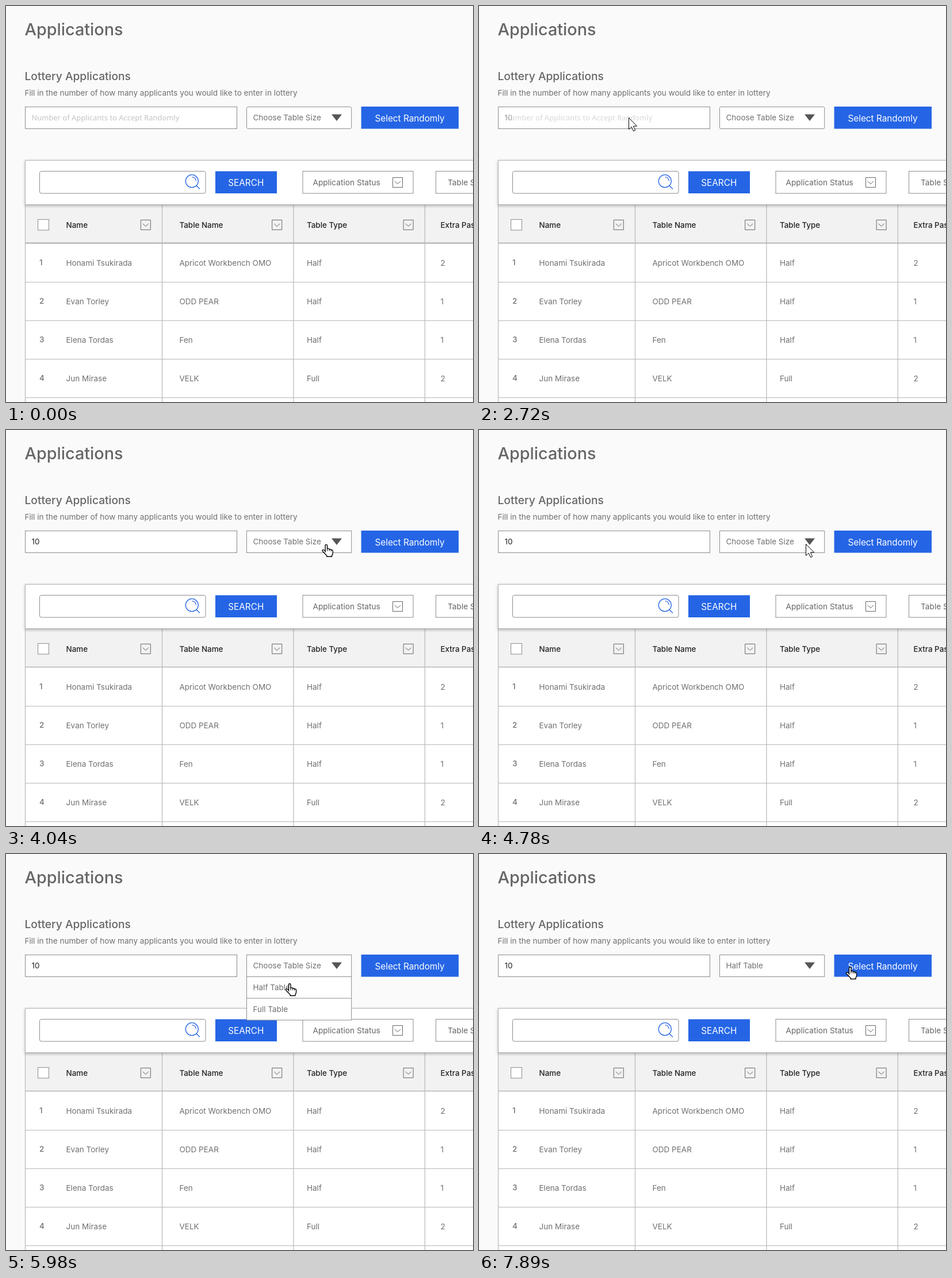
An HTML page that plays this animation: 812 by 689 pixels, repeating every 7.99 s.

```html
<!DOCTYPE html>
<html lang="en">
<head>
<meta charset="utf-8">
<title>Applications</title>
<style>
html, body { margin: 0; width: 100%; height: 100%; overflow: hidden; background: #fafafa; }
svg { display: block; width: 812px; height: 689px; font: 13.5px Inter, sans-serif; font-optical-sizing: none; }
text { fill: #707070; }
.title { font-size: 28.8px; font-weight: 500; fill: #666; }
.sub { font-size: 19.2px; font-weight: 500; fill: #666; }
.head { font-size: 13.4px; font-weight: 500; fill: #222; }
.num { font-weight: 500; }
.filter { font-size: 13.7px; fill: #666; }
.btn { font-size: 15.3px; fill: #fff; }
.hint { font: 12.93px "Noto Sans", sans-serif; fill: #c4c4c4; }
.value { fill: #222; }
.box { fill: #fff; stroke: #8c8c8c; }
.line { fill: none; stroke: #b8b8b8; stroke-width: 1.2; }
.blue { fill: #2565e5; }
.icon { fill: none; stroke: #2565e5; stroke-width: 1.3; stroke-linecap: round; }
.chev { fill: none; stroke: #666; }
.panel { fill: #fff; stroke: #b4b4b4; filter: drop-shadow(0 2px 2.5px #0004); }
.cursor { fill: #fff; stroke: #000; stroke-linejoin: round; }
</style>
</head>
<body>
<svg viewBox="0 0 812 689">
  <text class="title" x="32.5" y="50.5">Applications</text>
  <text class="sub" id="sub" x="32.5">Lottery Applications</text>
  <text x="32.5" y="155.6" font-size="13.55">Fill in the number of how many applicants you would like to enter in lottery</text>

  <rect class="box" x="33.5" y="175.5" width="368" height="38"/>
  <text class="hint" id="hint" x="44.5" y="199">Number of Applicants to Accept Randomly</text>
  <text class="value" id="value" x="44.5" y="199.3">10</text>

  <rect class="blue" x="617.6" y="175" width="169.4" height="38.6"/>
  <text class="btn" x="641.5" y="200.5">Select Randomly</text>

  <g id="table"></g>
  <path class="line" id="rule" d="M33 412.5H812"/>

  <rect class="panel" x="33.5" y="268.5" width="800" height="77"/>
  <rect class="box" x="58.5" y="287.5" width="288.5" height="38.5" rx="3"/>
  <g class="icon">
    <circle cx="323.3" cy="304.7" r="11"/>
    <path d="M331.5 313L336.5 318M324 297.7A7 7 0 0 1 330.3 304"/>
  </g>
  <rect class="blue" x="364" y="287.5" width="107" height="38.5"/>
  <text class="btn" x="386.3" y="313">SEARCH</text>
  <rect class="box" x="516" y="287.5" width="192" height="38.5"/>
  <text class="filter" x="533.5" y="312">Application Status</text>
  <rect class="box" x="747.5" y="287.5" width="192" height="38.5"/>
  <text class="filter" x="768" y="312">Table Size</text>
  <g id="chevrons"></g>

  <rect class="box" id="select" x="418.5" y="175.5" width="182.2" height="38"/>
  <g id="menu">
    <path class="box" d="M418.5 213.5H600.7V289H418.5ZM418.5 251H600.7"/>
    <text x="429.5" y="237">Half Table</text>
    <text x="429.5" y="275">Full Table</text>
  </g>
  <text id="choose" x="429.5" y="199.3">Choose Table Size</text>
  <text id="chosen" x="429.5" y="199.3">Half Table</text>
  <path d="M566 188.5H584L575 200Z" fill="#555"/>

  <g class="cursor" id="cursor">
    <path id="arrow" d="M.5 .5V20.5L5.2 16.2L8.6 23.6L11.6 22.3L8.4 15H14.6Z"/>
    <g id="hand" stroke-width="1.4">
      <path d="M.5 13.5V2.3Q.5 .7 2.2 .7T4 2.3V8Q7.2 7 7.5 9Q10.2 8 10.7 10Q13.6 9.4 13.6 12V15Q13.6 18 12 19.5V21.5H3.2V20Q1 17.5 -4 12.2Q-5.3 10.6 -3.8 9.8Q-2 9.2 .5 12Z"/>
      <path d="M4 8V12M7.5 9V12M10.7 10V12.5" stroke-width="1"/>
    </g>
    <circle id="click" r="15" fill="#efef00" fill-opacity=".47" stroke="none"/>
  </g>
</svg>
<script>
const LOOP = 7990;
const $ = id => document.getElementById(id);
const text = (x, y, s, cls = '') => `<text class="${cls}" x="${x}" y="${y}">${s}</text>`;
const chevron = (x, y) =>
  `<path class="chev" d="M${x - 8.5} ${y - 8.5}h17v17h-17ZM${x - 5} ${y - 2}l5 4.5l5 -4.5"/>`;

// Table
const COL = 228.4, ROW = 67;
const cols = [104.5, 301.5, 523, 755.5];
const heads = ['Name', 'Table Name', 'Table Type', 'Extra Passes'];
const rows = [
  ['Honami Tsukirada', 'Apricot Workbench OMO', 'Half', 2],
  ['Evan Torley', 'ODD PEAR', 'Half', 1],
  ['Elena Tordas', 'Fen', 'Half', 1],
  ['Jun Mirase', 'VELK', 'Full', 2]
];
let table = `<rect class="line" x="33.5" y="345" width="800" height="360" style="fill:#fff"/>
  <rect x="34" y="345" width="800" height="67.5" fill="#f2f2f2"/>
  <rect class="box" x="55.5" y="371.5" width="19" height="18.5"/>`;
let chevrons = chevron(681, 307);
heads.forEach((h, i) => {
  table += text(cols[i], 385.8, h, 'head') + `<path class="line" d="M${271.5 + COL * i} 345V689"/>`;
  chevrons += chevron(242.8 + COL * i, 380.8);
});
rows.forEach((row, r) => {
  const y = 451.8 + ROW * r;
  table += `<path class="line" d="M33 ${480.5 + ROW * r}H812"/>` + text(58, y - .5, r + 1, 'num');
  row.forEach((s, i) => table += text(cols[i], y, s));
});
$('table').innerHTML = table;
$('chevrons').innerHTML = chevrons;

// Pointer: each move eases out from the last stop to the next, some with a slight sway
const home = { x: 379, y: 497 };
const moves = [
  { from: 620, to: 1050, x: 309, y: 167, ease: 2 },
  { from: 1240, to: 1610, x: 260, y: 194, ease: 3.5 },
  { from: 3150, to: 3940, x: 549, y: 199, ease: 2.3, sway: 5 },
  { from: 3960, to: 4350, x: 568, y: 198, ease: 1.5 },
  { from: 5250, to: 5980, x: 491, y: 225, ease: 1.7 },
  { from: 7140, to: 7530, x: 643, y: 196, ease: 2 }
];
const clicks = [[1750, 1850], [4500, 4600], [6910, 6960], [7810, 7890]];
const hands = [[1290, 2390], [3360, 4780], [5480, 7010], [7810, LOOP]];

const within = (t, spans) => spans.some(([a, b]) => t >= a && t < b);
const ramp = (t, a, b) => Math.min(1, Math.max(0, (t - a) / (b - a)));

function pointer(t) {
  let { x, y } = home;
  for (const m of moves) {
    const k = 1 - (1 - ramp(t, m.from, m.to)) ** m.ease;
    x += (m.x - x) * k;
    y += (m.y - y) * k - (m.sway || 0) * Math.sin(2 * Math.PI * k);
  }
  return [x, y];
}

const fade = (id, v) => $(id).setAttribute('opacity', Number(v));

function draw(t) {
  const filled = ramp(t, 2670, 2820);
  const picked = ramp(t, 7050, 7185);
  fade('hint', 1 - filled);
  fade('value', filled);
  $('sub').setAttribute('y', 128.5 + filled / 2);
  $('select').setAttribute('rx', 3 * (1 - filled));
  $('rule').style.strokeWidth = 2.4 - filled;
  fade('menu', ramp(t, 4870, 5070) * (1 - picked));
  fade('choose', 1 - picked);
  fade('chosen', picked);

  const hand = within(t, hands);
  fade('cursor', t >= 640);
  fade('hand', hand);
  fade('arrow', !hand);
  fade('click', within(t, clicks));
  $('cursor').setAttribute('transform', `translate(${pointer(t)})`);
}

const start = performance.now();
function tick() {
  draw((performance.now() - start) % LOOP);
  requestAnimationFrame(tick);
}
tick();
</script>
</body>
</html>
```
